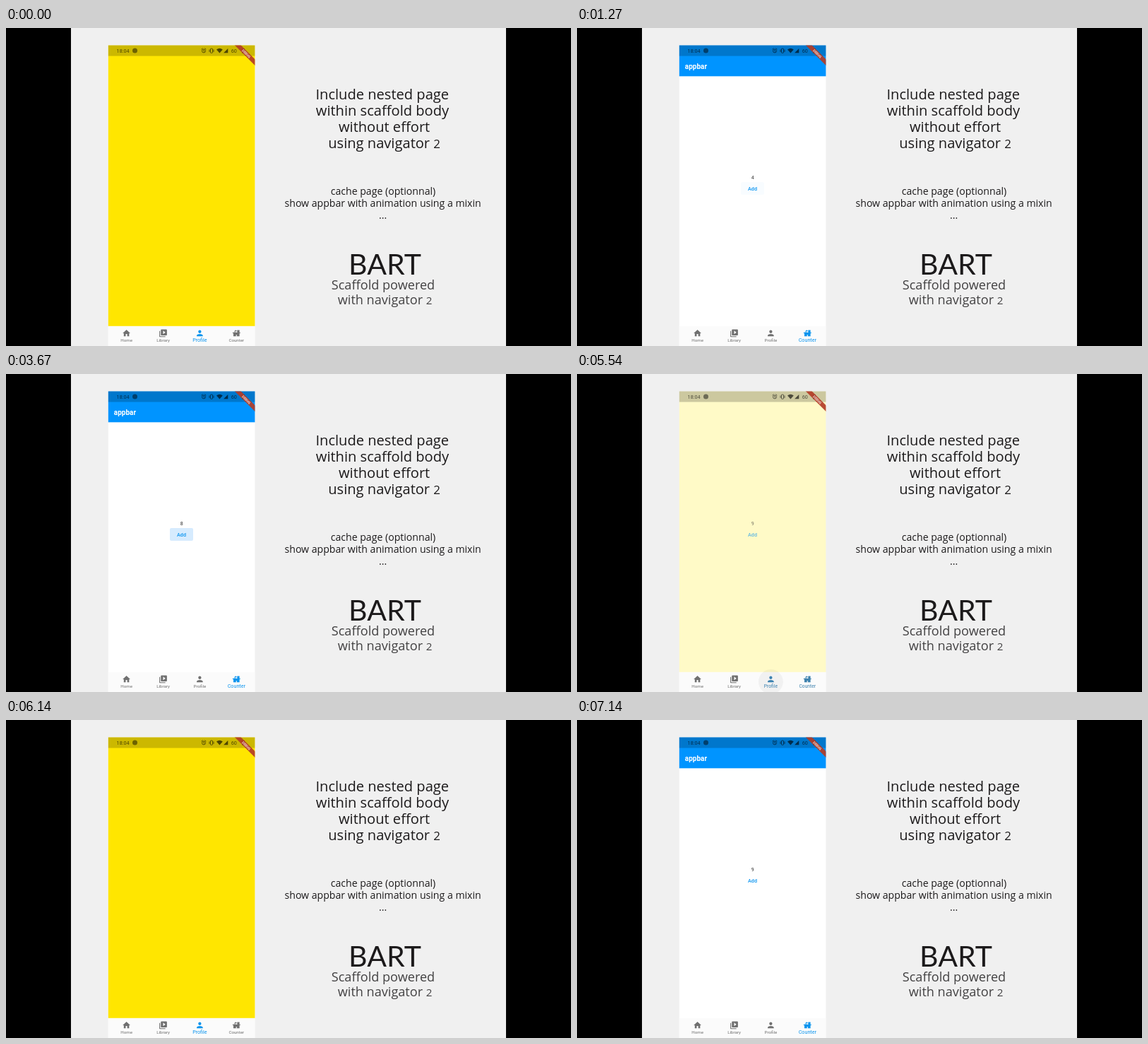
An HTML page for the animation above (7.31 s loop, 800x450 px).

```html
<!DOCTYPE html>
<html lang="en">
<head>
<meta charset="utf-8">
<title>Nested navigation</title>
<style>
  html, body { margin: 0; width: 100%; height: 100%; overflow: hidden; background: #000; }
  svg { display: block; width: 100vw; height: 100vh; }
  .pitch text { font-family: "Open Sans", sans-serif; text-anchor: middle; fill: #1c1a1b; }
  .headline { font-size: 20.1px; font-weight: 500; }
  .details { font-size: 14.1px; }
  .pitch .brand { font: 41px Lato, sans-serif; }
  .pitch .tagline { font-size: 18.1px; fill: #434243; }
  .low { font-size: 84%; }
  .phone text { font-family: Roboto, sans-serif; }
  .mid { text-anchor: middle; }
  .status { fill: #000; opacity: .62; }
</style>
</head>
<body>
<svg viewBox="0 0 800 450">
  <defs>
    <clipPath id="screen"><rect x="144.8" y="24.5" width="207.6" height="426"/></clipPath>
  </defs>
  <rect width="800" height="450"/>
  <rect x="92" width="616" height="450" fill="#f0f0f0"/>

  <g class="pitch">
    <g class="headline">
      <text x="532.8" y="101">Include nested page</text>
      <text x="533" y="124">within scaffold body</text>
      <text x="535.6" y="147">without effort</text>
      <text x="535.6" y="170">using navigator <tspan class="low">2</tspan></text>
    </g>
    <g class="details">
      <text x="534" y="236">cache page (optionnal)</text>
      <text x="533.6" y="253">show appbar with animation using a mixin</text>
      <text x="533.6" y="269.5">...</text>
    </g>
    <text class="brand" x="536.5" y="349">BART</text>
    <text class="tagline" x="534" y="370">Scaffold powered</text>
    <text class="tagline" x="536.6" y="391">with navigator <tspan class="low">2</tspan></text>
  </g>

  <g class="phone" clip-path="url(#screen)">
    <rect x="144" y="24" width="209" height="426" fill="#fff"/>
    <rect id="yellow" x="144" y="24" width="209" height="398" fill="#ffe600"/>
    <g id="counter">
      <rect id="press" x="232" y="218" width="33" height="18" rx="2" fill="#d6ebfe"/>
      <text id="count" class="mid" x="248.6" y="213.6" font-size="7" fill="#333"></text>
      <text class="mid" x="248.5" y="229.7" font-size="7.2" font-weight="500" fill="#0a94f0">Add</text>
    </g>

    <g id="appbar">
      <rect x="144" y="24" width="209" height="44.3" fill="#0094ff"/>
      <text x="152.8" y="57.8" font-size="10" font-weight="700" fill="#fff">appbar</text>
    </g>

    <rect x="144" y="24" width="209" height="15.6" opacity=".2"/>
    <g class="status">
      <text x="156.6" y="34.7" font-size="7.2">18:04</text>
      <circle cx="182.5" cy="32" r="3.5" opacity=".75"/>
      <g fill="none" stroke="#000" stroke-width=".9">
        <circle cx="280" cy="32.4" r="2.5"/>
        <path d="M276.7 30.2l1.8-1.6M283.3 30.2l-1.8-1.6M280 30.8v1.8l1.2.7M288 30.5v3.4M294 30.5v3.4"/>
        <rect x="289.5" y="29.2" width="3" height="6" rx=".6"/>
      </g>
      <path d="M298 30.4q4.4-3.2 8.8 0l-4.4 5.2zM314.3 29v6.3h-6.2z"/>
      <text x="318.8" y="34.7" font-size="7.2">60</text>
      <rect x="334" y="29" width="4" height="6.4" rx=".6"/>
    </g>

    <g transform="translate(340.3 36.4) rotate(45)">
      <rect x="-24" y="-3.1" width="48" height="6.2" fill="#b43c28" opacity=".92"/>
      <text class="mid" y="1.7" font-size="4.7" font-weight="700" fill="#fff" opacity=".85">DEBUG</text>
    </g>

    <rect x="144" y="421.8" width="209" height="29" fill="#fbfbfb"/>
    <circle id="ripple" cy="435.5" fill="#000"/>
    <g id="tabs"></g>
  </g>
</svg>

<script>
const LOOP = 7310;
const GREY = [112, 112, 112], BLUE = [10, 148, 238];
const $ = id => document.getElementById(id);

const tabs = [
  ['Home', 'M10 20v-6h4v6h5v-8h3L12 3 2 12h3v8z'],
  ['Library', 'M4 6H2v14c0 1.1.9 2 2 2h14v-2H4zM20 2H8c-1.1 0-2 .9-2 2v12c0 1.1.9 2 2 2h12c1.1 0 2-.9 2-2V4c0-1.1-.9-2-2-2zm-8 12.5v-9l6 4.5z'],
  ['Profile', 'M12 12a4 4 0 1 0 0-8 4 4 0 0 0 0 8zm0 2c-2.7 0-8 1.3-8 4v2h16v-2c0-2.7-5.3-4-8-4z'],
  ['Counter', 'M2 10h5V7a3 3 0 0 1 6 0h-2a1 1 0 0 0-2 0v3h6c-.6 0-1-.9-1-2V4h6v4c0 1.1-.4 2-1 2h3v2h-2v8h-7v-4h-2v4H4v-8H2z']
].map(([name, path], i) => {
  const x = 170.6 + i * 51.9;
  const group = document.createElementNS('http://www.w3.org/2000/svg', 'g');
  group.innerHTML =
    `<path d="${path}" transform="translate(${x - 6.5} 425.4) scale(.54)"/>` +
    `<text class="mid" x="${x}" y="444.3">${name}</text>`;
  $('tabs').append(group);
  return { group, label: group.lastChild, x };
});

// Piecewise linear track of [time, value] points.
function track(t, points) {
  let [t0, v0] = points[0];
  for (const [t1, v1] of points) {
    if (t < t1) return t <= t0 ? v0 : v0 + (v1 - v0) * (t - t0) / (t1 - t0);
    [t0, v0] = [t1, v1];
  }
  return v0;
}

// Page switches: start time and the tab that opens.
const switches = [[270, 3], [5340, 2], [6340, 3]];
const enter = [[0, 0], [200, .22], [500, .58], [720, 1]];
const leave = [[0, 1], [200, .65], [500, .13], [700, 0]];

// Button presses: down and up times.
const presses = [[1245, 1390], [1760, 1900], [2120, 2260], [2530, 2670], [3140, 3840]];

function paintTab({ group, label }, on) {
  group.setAttribute('fill', `rgb(${GREY.map((c, i) => c + (BLUE[i] - c) * on)})`);
  label.setAttribute('font-size', 6.2 + on);
}

function render(t) {
  const [start, tab] = switches.filter(s => s[0] <= t).pop() || [-2000, 2];
  const age = t - start, toCounter = tab === 3;

  $('yellow').setAttribute('opacity', track(age, toCounter ? leave : enter));
  $('counter').setAttribute('opacity', track(age, toCounter ? enter : leave));

  const bar = toCounter ? track(age, [[80, 0], [400, 1]]) : track(age, [[0, 1], [170, 0]]);
  $('appbar').setAttribute('transform', `translate(0 ${-46 * (1 - bar)})`);

  const on = track(age, [[100, 0], [300, 1]]);
  tabs.forEach((item, i) => paintTab(item, i === tab ? on : i === 5 - tab ? 1 - on : 0));

  $('ripple').setAttribute('cx', tabs[tab].x);
  $('ripple').setAttribute('r', track(age, [[0, 4], [200, 17.5]]));
  $('ripple').setAttribute('opacity', track(age, [[0, 0], [60, .04], [250, .04], [500, .006], [600, 0]]));

  $('count').textContent = 4 + presses.filter(p => p[1] <= t).length;
  $('press').setAttribute('opacity', Math.max(...presses.map(([down, up]) =>
    track(t, [[down, 0], [Math.min(down + 200, up), 1], [up, 1], [up + 260, 0]]))));
}

function frame() {
  render(performance.now() % LOOP);
  requestAnimationFrame(frame);
}
frame();
</script>
</body>
</html>
```
